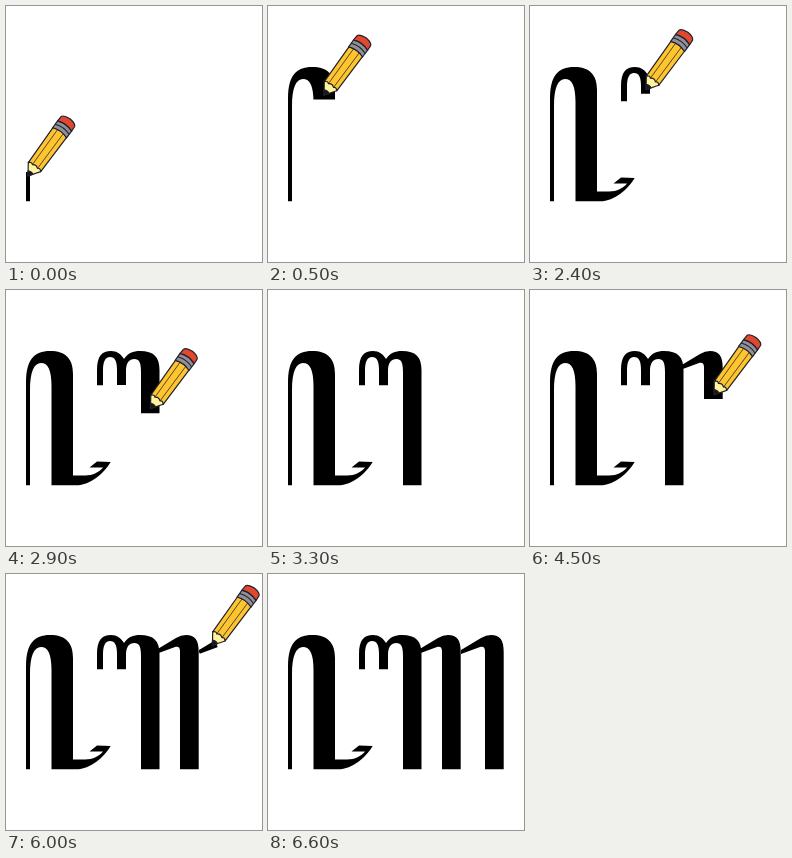
Recreate the animation shown at these times as an HTML page. Size 256 by 256 pixels, loop 8.6 s.

```html
<!DOCTYPE html>
<html lang="en">
<head>
<meta charset="utf-8">
<title>Writing a letter</title>
<style>
  html, body { margin: 0; width: 100%; height: 100%; overflow: hidden; background: #fff; }
  svg { display: block; width: 100%; height: 100%; }
  mask path { fill: none; stroke: #fff; }
</style>
</head>
<body>
<svg id="stage" viewBox="0 0 256 256">
  <defs id="defs"></defs>
  <g id="ink"></g>
  <g id="pencil" stroke="#20202c" stroke-width="1.2" stroke-linejoin="round">
    <path fill="#fff49c" d="M-7.7 -11 L0 0 L7.7 -11 L5 -17 H-5Z"/>
    <path fill="#16161c" d="M-3 -4.3 L0 0 L3 -4.3 Q0 -6 -3 -4.3Z"/>
    <path fill="#ffc52f" d="M-7.7 -11 Q-5 -14 -3.2 -11.8 Q0 -14.5 3.2 -11.8 Q5 -14 7.7 -11 L8.4 -54 Q0 -57 -8.4 -54Z"/>
    <path fill="none" stroke-width=".7" d="M-3.2 -12 L-3.5 -55 M3.2 -12 L3.5 -55"/>
    <path fill="#8f9098" d="M-8.6 -53.5 Q0 -57 8.6 -53.5 L8.7 -62 Q0 -65.5 -8.7 -62Z"/>
    <path fill="none" stroke-width="1" d="M-8.7 -57.8 Q0 -61.3 8.7 -57.8"/>
    <path fill="#e0482f" d="M-8.7 -62 Q0 -65.5 8.7 -62 L8.4 -67.5 Q7.3 -70.5 0 -71 Q-7.3 -70.5 -8.4 -67.5Z"/>
  </g>
</svg>
<script>
const LOOP = 8600, STEP = 100, LAG = 4;

// Evenly growing ink lengths: first value, growth per step, count
const grow = (first, by, count) => Array.from({ length: count }, (_, i) => first + by * i);

const stem = 'M150 76 L170 64 Q175 61 180 61 C189 61 192.7 66 192.7 78 V195.3 H174 V77 ' +
  'C174 73 172 72 169 73 L150 80Z';
const stemPath = 'M150 78 L166 70 Q184 62 184 82 V196';

const strokes = [
  {
    start: 0, width: 26, dx: 0,
    shape: 'M20 195.3 V92 C20 70 28 61 44 61 C60 61 67 69 67 84 V185.5 H79 C87 185.5 93 182 97 177.5 ' +
      'H83.5 L91 171.5 L104.7 172 C98 183 85 195.3 70 195.3 H45.5 V96 C45.5 80 42 73 35 73 ' +
      'C28 73 24 82 24 100 V195.3Z',
    path: 'M22 196 V88 C22 60 56 60 56 88 V191 H76 Q90 189 101.5 174 L88 175',
    lens: [...grow(30, 28.7, 9), 298, 327, 338]
  },
  {
    start: 2200, width: 21, dx: 0,
    shape: 'M91 95.2 V80 C91 66 96 61 105 61 C111 61 115 64 118 69 C122 63 127 61 134 61 ' +
      'C148 61 153.5 67 153.5 80 V195.3 H135 V82 C135 72 133 69 128.5 69 C123 69 120 73 120 81 ' +
      'V95.2 H111 V80 C111 71 109 67 104 67 C99 67 97 72 97 81 V95.2Z',
    path: 'M94 96 V78 C94 59 116 59 116 78 V95 V78 C116 60 144.5 60 144.5 78 V196',
    lens: [...grow(22.6, 22.6, 8), 207, 233, 253]
  },
  { start: 4300, width: 24, dx: 0, shape: stem, path: stemPath, lens: [...grow(15, 29, 6), 163] },
  { start: 6000, width: 24, dx: 43, shape: stem, path: stemPath, lens: [...grow(19, 29, 5), 162] }
];

const byId = id => document.getElementById(id);
const pencil = byId('pencil');

function add(parent, tag, attrs) {
  const el = document.createElementNS('http://www.w3.org/2000/svg', tag);
  for (const key in attrs) el.setAttribute(key, attrs[key]);
  return parent.appendChild(el);
}

strokes.forEach((s, i) => {
  const mask = add(byId('defs'), 'mask', {
    id: 'reveal' + i, maskUnits: 'userSpaceOnUse', x: 0, y: 0, width: 256, height: 256
  });
  s.guide = add(mask, 'path', { d: s.path, 'stroke-width': s.width });
  s.total = s.guide.getTotalLength();
  s.group = add(byId('ink'), 'g', { transform: `translate(${s.dx} 0)` });
  s.fill = add(s.group, 'path', { d: s.shape });
});

function draw(time) {
  const t = time % LOOP;
  let tip = null;
  strokes.forEach((s, i) => {
    const n = Math.floor((t - s.start) / STEP);
    s.group.style.display = n < 0 ? 'none' : '';
    if (n < 0) return;
    if (n >= s.lens.length) {
      s.fill.removeAttribute('mask');
      return;
    }
    const len = s.lens[n];
    s.guide.setAttribute('stroke-dasharray', len + ' 999');
    s.fill.setAttribute('mask', `url(#reveal${i})`);
    const p = s.guide.getPointAtLength(Math.min(len, s.total) - LAG);
    tip = [p.x + s.dx, p.y];
  });
  pencil.style.display = tip ? '' : 'none';
  if (tip) pencil.setAttribute('transform', `translate(${tip}) rotate(36.2)`);
}

function tick() {
  draw(performance.now());
  requestAnimationFrame(tick);
}
tick();
</script>
</body>
</html>
```
